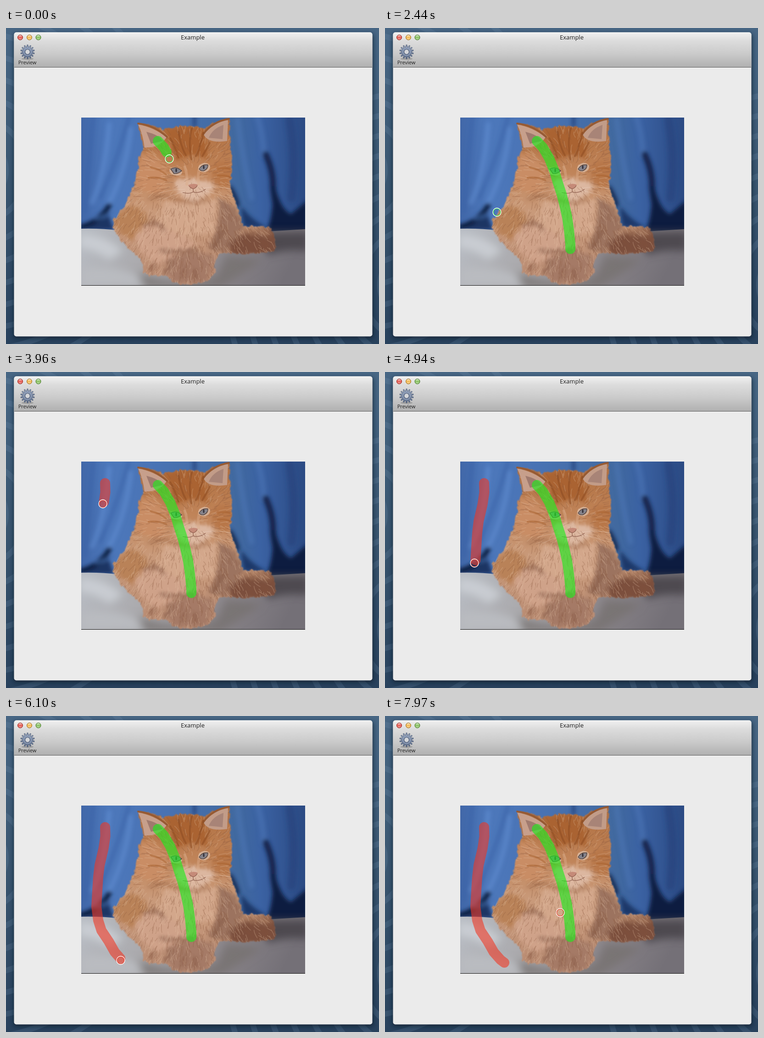
These frames come from a looping animation (813x688 px, 8 s). An HTML page:

```html
<!DOCTYPE html>
<html lang="en">
<head>
<meta charset="utf-8">
<title>Example</title>
<style>
  html, body { margin: 0; width: 100%; height: 100%; overflow: hidden; background: #38546f; }
  svg { position: absolute; left: 0; top: 0; width: 813px; height: 688px; }
  #overlay { will-change: transform; }
  text { font-family: "Open Sans", "Noto Sans", sans-serif; fill: #1c1c1c; }
  .trail { fill: none; stroke-width: 22; stroke-linecap: round; stroke-linejoin: round; }
  .hair { fill: none; stroke-width: 1.4; stroke-linecap: round; }
</style>
</head>
<body>
<svg viewBox="0 0 813 688">
  <defs>
    <linearGradient id="desk" x1="0" y1="0" x2="0" y2="1">
      <stop offset="0" stop-color="#476684"/><stop offset=".5" stop-color="#39556f"/><stop offset="1" stop-color="#28415c"/>
    </linearGradient>
    <linearGradient id="bar" x1="0" y1="0" x2="0" y2="1">
      <stop offset="0" stop-color="#f0f0f0"/><stop offset=".25" stop-color="#dcdcdc"/>
      <stop offset=".6" stop-color="#cbcbcb"/><stop offset="1" stop-color="#b0b0b0"/>
    </linearGradient>
    <linearGradient id="shine" x1="0" y1="0" x2="0" y2="1">
      <stop offset="0" stop-color="#fff" stop-opacity=".85"/><stop offset=".45" stop-color="#fff" stop-opacity=".1"/>
      <stop offset="1" stop-color="#fff" stop-opacity=".5"/>
    </linearGradient>
    <linearGradient id="steel" x1="0" y1="0" x2="0" y2="1">
      <stop offset="0" stop-color="#a0aec6"/><stop offset="1" stop-color="#5b6c8a"/>
    </linearGradient>
    <linearGradient id="cloth">
      <stop offset="0" stop-color="#4167a8"/><stop offset=".12" stop-color="#4d78bb"/><stop offset=".3" stop-color="#4a74b6"/>
      <stop offset=".7" stop-color="#41699f"/><stop offset=".8" stop-color="#3b62a3"/><stop offset="1" stop-color="#2b4a83"/>
    </linearGradient>
    <linearGradient id="rug" x1="0" y1="0" x2="1" y2=".12">
      <stop offset="0" stop-color="#b9bdc4"/><stop offset=".35" stop-color="#aaa9ac"/>
      <stop offset=".7" stop-color="#8a858a"/><stop offset="1" stop-color="#747077"/>
    </linearGradient>
    <linearGradient id="coat" gradientUnits="userSpaceOnUse" x1="0" y1="205" x2="0" y2="560">
      <stop offset="0" stop-color="#b06f40"/><stop offset=".3" stop-color="#c08459"/>
      <stop offset=".55" stop-color="#c99a7a"/><stop offset="1" stop-color="#b88b73"/>
    </linearGradient>
    <filter id="soft" x="-50%" y="-50%" width="200%" height="200%"><feGaussianBlur stdDeviation="4.500"/></filter>
    <filter id="blur" x="-50%" y="-50%" width="200%" height="200%"><feGaussianBlur stdDeviation="9"/></filter>
    <filter id="fur" x="-10%" y="-10%" width="120%" height="120%" color-interpolation-filters="sRGB">
      <feTurbulence type="fractalNoise" baseFrequency=".13 .08" numOctaves="2" seed="4"/>
      <feDisplacementMap in="SourceGraphic" scale="11" xChannelSelector="R" yChannelSelector="G"/>
      <feGaussianBlur stdDeviation="1.300"/>
    </filter>
    <clipPath id="photo"><rect x="164" y="195" width="488" height="365"/></clipPath>
    <path id="body" d="M288 208Q312 208 345 222Q385 206 432 219Q458 202 486 198Q486 232 490 266Q496 310 488 348
      Q506 385 516 430Q550 430 576 435Q592 456 585 486Q540 495 485 489Q470 486 456 505Q460 535 440 550Q400 566 365 554L347 538
      Q318 544 298 531Q300 505 278 489Q250 468 233 434Q234 411 258 390Q278 352 286 312Q288 285 299 262Q294 232 288 208Z"/>
    <clipPath id="inBody"><use href="#body"/></clipPath>
  </defs>

  <rect width="813" height="688" fill="url(#desk)"/>
  <g id="swirls" fill="none" stroke="#7d9bb6" stroke-opacity=".17" stroke-width="12"></g>
  <rect x="16" y="12" width="785" height="664" rx="7" fill="#0b1a2c" opacity=".65" filter="url(#soft)"/>
  <rect x="17.500" y="9.500" width="781" height="662" rx="5" fill="#ebebeb"/>
  <path d="M17.500 85.500V15q0-5.500 5.500-5.500H793q5.500 0 5.500 5.500V85.500Z" fill="url(#bar)"/>
  <path d="M22 10.500H794" stroke="#fafafa"/>
  <path d="M18 85.500H798" stroke="#5c5c5c"/>
  <g id="lights"></g>
  <text x="407" y="25" font-size="13" text-anchor="middle">Example</text>
  <ellipse cx="47" cy="67" rx="13" ry="2.500" fill="#555" opacity=".3"/>
  <path id="gear" fill="url(#steel)" stroke="#4c5a74" stroke-linejoin="round"/>
  <circle cx="47" cy="52" r="8" fill="none" stroke="#8a99b3" stroke-width="2"/>
  <circle cx="47" cy="52" r="5.500" fill="#d3d5d9" stroke="#4a5872" stroke-width="1.200"/>
  <text x="46.500" y="79" font-size="11" text-anchor="middle">Preview</text>

  <g clip-path="url(#photo)">
    <rect x="164" y="195" width="488" height="365" fill="url(#cloth)"/>
    <g filter="url(#soft)" fill="none" stroke-linecap="round">
      <path d="M190 195Q180 300 172 400M268 195Q238 300 205 370" stroke="#3a62a6" stroke-width="8" opacity=".6"/>
      <path d="M225 210Q215 320 188 380M272 220Q262 310 225 380" stroke="#6492d6" stroke-width="10" opacity=".5"/>
      <path d="M160 428Q200 418 222 380Q222 410 236 440H160Z" fill="#1d3564"/>
      <path d="M166 432Q205 424 226 386" stroke="#0f1d3c" stroke-width="9"/>
      <path d="M196 415Q215 412 234 400" stroke="#426cac" stroke-width="7" opacity=".7"/>
      <path d="M411 192V214" stroke="#21407a" stroke-width="6"/>
      <path d="M505 200Q515 280 535 370M548 195Q560 230 562 275" stroke="#5079b8" stroke-width="12" opacity=".5"/>
      <path d="M489 348Q500 366 505 385" stroke="#14284d" stroke-width="9"/>
      <path d="M514 392Q530 415 560 432H520Z" fill="#1d3869" stroke="#1d3869" stroke-width="4"/>
      <path d="M566 275Q583 310 582 350Q588 395 600 438" stroke="#12244a" stroke-width="13"/>
      <path d="M584 345Q598 400 622 408L655 380V444H570Q586 410 584 345Z" fill="#101f40" stroke="#101f40" stroke-width="5"/>
      <path d="M618 200Q632 280 622 370" stroke="#25427a" stroke-width="18" opacity=".6"/>
    </g>
    <path d="M164 437Q210 436 245 441L520 446L652 438V560H164Z" fill="url(#rug)"/>
    <g filter="url(#blur)">
      <path d="M560 444H660V486Q610 480 570 495Z" fill="#4d4850"/>
      <path d="M160 450Q215 448 255 485L225 505Q190 480 160 478Z" fill="#cfd3d8" opacity=".8"/>
      <path d="M164 525Q230 510 300 545V562H164Z" fill="#b9bbc0"/>
      <path d="M285 530Q380 570 460 540L480 495L560 505L470 565H300Z" fill="#76706f" opacity=".75"/>
    </g>

    <g filter="url(#fur)">
      <use href="#body" fill="url(#coat)"/>
      <g clip-path="url(#inBody)" filter="url(#soft)">
        <path d="M345 222Q385 205 432 220L442 285Q408 268 372 290Z" fill="#aa6431"/>
        <path d="M295 275Q330 270 350 310L345 355Q310 365 280 345Z" fill="#c98d65"/>
        <path d="M448 300Q490 270 500 320L480 350Q450 350 448 300Z" fill="#b8774a"/>
        <path d="M365 335Q408 318 455 340Q450 368 407 377Q372 368 365 335Z" fill="#dcb7a0"/>
        <path d="M345 378Q408 388 460 372L455 440Q395 470 325 435Z" fill="#d3a78b"/>
        <path d="M255 395Q290 370 310 420L285 465Q240 450 232 420Z" fill="#b98258"/>
        <path d="M300 430Q350 430 420 470L330 515Q285 490 280 455Z" fill="#cfa289"/>
        <path d="M462 370Q505 380 520 430L480 492L440 480Q470 430 462 370Z" fill="#9c735f"/>
        <path d="M350 505Q400 478 455 495L440 555H360Z" fill="#a57a66"/>
        <path d="M485 470Q535 425 595 435V495H490Z" fill="#7b503d"/>
        <path d="M516 442Q545 440 575 448" stroke="#a5775d" stroke-width="13" fill="none"/>
        <path d="M335 485Q360 490 420 482M345 538L360 505M446 480Q465 465 472 440" stroke="#875c47" stroke-width="6" fill="none"/>
        <path d="M310 372Q350 360 375 374Q408 388 440 372" stroke="#a97552" stroke-width="6" fill="none"/>
        <path d="M300 430Q330 415 345 440M385 545L392 520M415 550L412 522M315 530L322 512" stroke="#8a5c46" stroke-width="6" fill="none"/>
      </g>
    </g>
    <g id="hairs" clip-path="url(#inBody)"></g>
    <path d="M288 210Q322 216 350 238Q333 262 302 260Q298 230 288 210Z" fill="#c79f8b"/>
    <path d="M306 226Q332 232 342 246L316 252Z" fill="#a07a6e"/>
    <path d="M484 200Q452 206 431 232Q440 252 482 246Z" fill="#c29c88"/>
    <path d="M474 211Q450 219 442 239L472 242Z" fill="#a88477"/>
    <path d="M288 208Q322 211 351 237M430 231Q450 203 486 198" fill="none" stroke="#965a33" stroke-width="4" stroke-linecap="round"/>
    <g fill="none" stroke="#8c4b21" stroke-width="4" stroke-linecap="round" opacity=".5">
      <path d="M376 226Q380 255 392 277M405 219Q397 245 404 286M430 228Q424 257 414 279M358 240Q371 264 376 282M444 250Q436 266 428 279"/>
      <path d="M315 303Q335 307 349 319M311 326Q332 324 349 331M462 308Q476 303 488 307M462 322Q477 319 489 325" stroke="#a9622f"/>
    </g>
    <path d="M389 300Q397 322 394 343M424 298Q416 321 420 342" fill="none" stroke="#d9ab8b" stroke-width="6" opacity=".45"/>
    <g fill="#dfc5b2" opacity=".65">
      <ellipse cx="370" cy="312" rx="14" ry="9" transform="rotate(12 370 312)"/>
      <ellipse cx="432" cy="304" rx="13" ry="10" transform="rotate(-14 432 304)"/>
    </g>
    <g fill="#85838b" stroke="#54403a" stroke-width="1.400">
      <path d="M359 307Q371 300 383 311Q375 318 366 317Z"/>
      <path d="M421 307Q427 296 440 298Q441 307 431 311Q424 312 421 307Z"/>
    </g>
    <g fill="#35313a"><ellipse cx="371" cy="310" rx="1.700" ry="4"/><ellipse cx="431" cy="303" rx="1.700" ry="4"/></g>
    <path d="M397 342Q408 337 418 341Q415 349 408 351Q400 349 397 342Z" fill="#c58a78"/>
    <path d="M408 350V357Q398 362 385 358M408 357Q421 361 435 351M399 344Q403 349 408 350Q414 349 417 343" fill="none" stroke="#8f604f" stroke-width="1.200"/>
    <path d="M425 349Q460 344 490 350M423 353Q455 358 480 369M391 351Q360 351 332 360M391 355Q365 362 344 373" fill="none" stroke="#f0dccd" opacity=".35"/>
  </g>
  <path d="M164 560.500H652" stroke="#111"/>
</svg>

<svg id="overlay" viewBox="0 0 813 688">
  <path id="keep" class="trail" stroke="rgb(34,232,32)" stroke-opacity=".65"/>
  <path id="drop" class="trail" stroke="rgb(238,55,36)" stroke-opacity=".6"/>
  <g id="brush" fill="none">
    <circle r="7.800" id="tint" stroke-width="1.200"/>
    <circle r="9" stroke="#fff" stroke-width="1.300"/>
  </g>
</svg>

<script>
const $ = id => document.getElementById(id);
const LOOP = 8000, LAG = 40;

// Pointer path: [ms, x, y]
const path = [
  [-140, 331, 246], [-70, 344, 260], [0, 358, 284], [130, 369, 311], [230, 375.5, 333],
  [360, 385, 362], [460, 391, 385], [580, 397, 412], [700, 401, 440], [840, 404, 471],
  [950, 404, 476], [1070, 404, 481], [1250, 404, 481], [1600, 249, 405], [1840, 249, 405],
  [2020, 246, 400], [2440, 246, 400], [3200, 209, 283], [3440, 216, 242], [3640, 216.5, 262],
  [3960, 213, 286], [4020, 212, 291], [4300, 204, 325], [4500, 201, 350], [4700, 199, 380],
  [4880, 197.5, 407], [4940, 197, 415], [5200, 201, 445], [5430, 208, 467], [5690, 224, 491],
  [5900, 237, 514], [6100, 252, 531], [6510, 260, 537], [6980, 260, 537], [7740, 305, 499],
  [7970, 384, 427], [8000, 384, 427]
];

function at(t) {
  const i = Math.max(1, path.findIndex(p => p[0] >= t));
  const [a, x, y] = path[i - 1], [b, u, v] = path[i];
  const k = (t - a) / (b - a);
  return [x + (u - x) * k, y + (v - y) * k];
}

function trail(el, from, to, now) {
  const end = Math.min(now - LAG, to);
  if (end < from) return el.setAttribute('d', '');
  const pts = path.filter(p => p[0] >= from && p[0] < end).map(p => p.slice(1));
  el.setAttribute('d', 'M' + [...pts, at(end)].join('L') + 'l.01 0');
}

function draw(now) {
  const t = now % LOOP, [x, y] = at(t);
  trail($('keep'), -140, 1070, t);
  trail($('drop'), 3440, 6510, t);
  $('brush').setAttribute('transform', `translate(${x - 2} ${y + 1})`);
  $('tint').setAttribute('stroke', t < 3230 ? '#35e23c' : '#e8402c');
}

let seed = 7;
const rnd = () => (seed = seed * 16807 % 2147483647) / 2147483647;

// Fur runs outward on the face and downward on the body
function hairs(color, opacity, count) {
  let d = '';
  for (let i = 0; i < count; i++) {
    const x = 230 + rnd() * 360, y = 205 + rnd() * 350;
    const dir = y < 370 ? Math.atan2(y - 325, x - 407) : Math.PI / 2 + (400 - x) / 220;
    const a = dir + (rnd() - .5) * .8, len = 7 + rnd() * 13;
    const dx = Math.cos(a) * len, dy = Math.sin(a) * len, bend = (rnd() - .5) * 6;
    const parts = [dx / 2 + bend, dy / 2, dx, dy].map(n => n.toFixed(1)).join(' ');
    d += `M${x.toFixed(1)} ${y.toFixed(1)}q${parts}`;
  }
  return `<path class="hair" d="${d}" stroke="${color}" opacity="${opacity}"/>`;
}
$('hairs').innerHTML = hairs('#85543a', .3, 900) + hairs('#e3c0a6', .28, 800);

const lights = [[31, '#e2463c', '#8e211b'], [51, '#f0b03c', '#95641a'], [70.5, '#79b84c', '#3f6f22']];
$('lights').innerHTML = lights.map(([x, fill, edge]) =>
  `<circle cx="${x}" cy="20.500" r="5.500" fill="${fill}" stroke="${edge}"/>
   <circle cx="${x}" cy="20.500" r="4.700" fill="url(#shine)"/>`).join('');

const teeth = 14, cog = [];
for (let i = 0; i < teeth * 4; i++) {
  const tip = i % 4 < 2, r = tip ? 15.2 : 11;
  const a = ((i >> 2) + (tip ? (i % 4 - .5) * .3 : (i % 4 - 2.5) * .4 + .5)) / teeth * Math.PI * 2;
  cog.push([47 + Math.sin(a) * r, 52 - Math.cos(a) * r]);
}
$('gear').setAttribute('d', 'M' + cog.join('L') + 'Z');

let rings = '';
for (let i = 0; i < 9; i++) {
  rings += `<circle cx="-70" cy="310" r="${70 + i * 46}"/><circle cx="900" cy="560" r="${85 + i * 42}"/>`;
}
$('swirls').innerHTML = rings;

let start;
function tick(now) {
  start ??= now;
  draw(now - start);
  requestAnimationFrame(tick);
}
draw(0);
requestAnimationFrame(tick);
</script>
</body>
</html>
```
